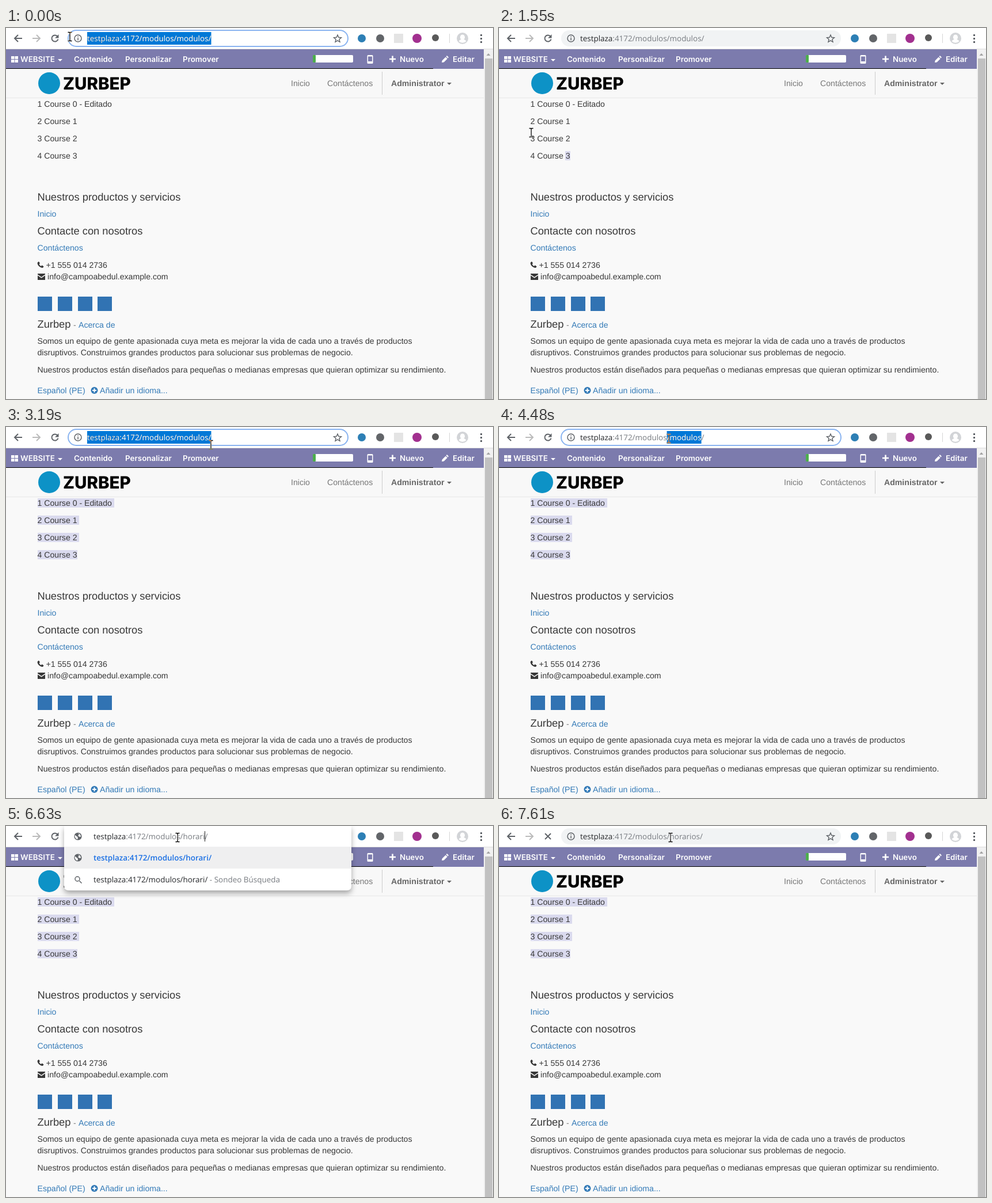
Recreate the animation shown at these times as an HTML page. Size 846x645 px, loop 8 s.

```html
<!DOCTYPE html>
<html lang="es">
<head>
<meta charset="utf-8">
<style>
  html, body { margin: 0; width: 100%; height: 100%; overflow: hidden; background: #f9f9f9; }
  svg { display: block; }
  text { white-space: pre; text-rendering: geometricPrecision; }
  .body { font: 14.12px "Liberation Sans", Arial, sans-serif; fill: #383838; }
  .head { font-size: 18.3px; }
  .link { fill: #337ab7; }
  .menu { fill: #777; }
  .nav { font: 600 13.4px Inter, sans-serif; fill: #fff; }
  .bar { font: 13.45px "Open Sans", sans-serif; fill: #777b80; }
  .dark { fill: #26282b; }
  .line { fill: none; stroke: #5f6368; stroke-width: 2; }
  #ibeam { mix-blend-mode: difference; }
  #popup { filter: drop-shadow(0 5px 5px #0005); }
</style>
</head>
<body>
<svg width="846" height="645" viewBox="0 0 846 645">
  <defs>
    <g id="globe">
      <circle r="6.6" fill="#5f6368"/>
      <path d="M-5-2.5Q-3 0-1 .5L0 3-1 5.3Q-5 4-5.4 0zM0-5.2L2-3.5 0-1 3 1 5 .5Q5-4 0-5.2z" fill="#fff"/>
    </g>
    <path id="caretDown" d="M-4-2h8l-4 4z"/>
    <clipPath id="selectedClip"><rect id="clipBox" y="7" height="22"/></clipPath>
  </defs>

  <!-- page -->
  <rect y="71" width="830" height="50" fill="#f8f8f8"/>
  <rect y="121" width="830" height="1" fill="#e7e7e7"/>
  <circle cx="75" cy="96" r="19" fill="#0d92c6"/>
  <text x="99" y="107" style="font:800 29.5px Inter,sans-serif">ZURBEP</text>
  <g id="marks" fill="#dadaee"></g>
  <g class="body">
    <text class="menu" x="495" y="101">Inicio</text>
    <text class="menu" x="558" y="101">Contáctenos</text>
    <rect x="653" y="76" width="1" height="40" fill="#ccc"/>
    <text x="669" y="101" style="font-weight:bold;fill:#666">Administrator</text>
    <use href="#caretDown" x="770" y="97" fill="#666"/>
    <text x="54.5" y="137">1 Course 0 - Editado</text>
    <text x="54.5" y="167">2 Course 1</text>
    <text x="54.5" y="197">3 Course 2</text>
    <text x="54.5" y="227">4 Course 3</text>
    <text class="head" x="54.5" y="300">Nuestros productos y servicios</text>
    <text class="link" x="54.5" y="328">Inicio</text>
    <text class="head" x="54.5" y="359">Contacte con nosotros</text>
    <text class="link" x="54.5" y="387">Contáctenos</text>
    <path d="M57 406l2 3-1.500 1.500q1 2.500 3.500 3.500l1.500-1.500 3 2q-1 3-3 2.500-7-2-8-8 0-2 2.500-3z"/>
    <text x="69.500" y="417">+1 555 014 2736</text>
    <path d="M55 427h13v1.500l-6.500 4.500-6.500-4.500zm0 3.300l6.500 4.400 6.500-4.400v7.700h-13z"/>
    <text x="72" y="437">info@campoabedul.example.com</text>
    <path d="M55 467h25v25h-25zm35 0h25v25h-25zm35 0h25v25h-25zm34 0h25v25h-25z" fill="#3173b3"/>
    <text class="head" x="54.5" y="521">Zurbep</text>
    <text class="menu" x="117" y="521">-</text>
    <text class="link" x="126" y="521">Acerca de</text>
    <text x="54.5" y="549">Somos un equipo de gente apasionada cuya meta es mejorar la vida de cada uno a través de productos</text>
    <text x="54.5" y="569">disruptivos. Construimos grandes productos para solucionar sus problemas de negocio.</text>
    <text x="54.5" y="599">Nuestros productos están diseñados para pequeñas o medianas empresas que quieran optimizar su rendimiento.</text>
    <text class="link" x="54.5" y="635">Español (PE)</text>
    <circle class="link" cx="153.500" cy="630" r="6"/>
    <path d="M150 630h7m-3.500-3.500v7" stroke="#fff" stroke-width="2"/>
    <text class="link" x="163" y="635">Añadir un idioma...</text>
  </g>

  <!-- site bar -->
  <path d="M0 37h830v34H0z" fill="#7c7bad"/>
  <path d="M0 70h742v1H0z"/>
  <rect id="hover" x="297" y="37" width="85" height="33"/>
  <g class="nav">
    <path d="M9 49h5.500v5H9zm6.500 0H21v5h-5.500zM9 55h5.500v5H9zm6.500 0H21v5h-5.500z"/>
    <text x="25" y="59">WEBSITE</text>
    <use href="#caretDown" x="94" y="56"/>
    <text x="118" y="59">Contenido</text>
    <text x="207" y="59">Personalizar</text>
    <text x="307" y="59">Promover</text>
    <rect x="533" y="47" width="70" height="13" rx="2"/>
    <rect x="533" y="47" width="5" height="13" rx="1" fill="#4cae4c"/>
    <path d="M629 47h7q1.500 0 1.500 1.500v12q0 1.500-1.500 1.500h-7q-1.500 0-1.500-1.500v-12q0-1.500 1.500-1.500zm0 2.500v8.500h7v-8.500z" fill-rule="evenodd"/>
    <path d="M666 54h11m-5.500-5.500v11" stroke="#fff" stroke-width="2.600"/>
    <text x="684" y="59">Nuevo</text>
    <path d="M757 60l.7-3.500 6-6 3 3-6 6zm7.500-10.500l1.500-1.500 3 3-1.500 1.500z"/>
    <text x="776" y="59">Editar</text>
  </g>

  <!-- scrollbar -->
  <path d="M830 37h16v608h-16z" fill="#f1f1f1"/>
  <path d="M832 53h13v592h-13z" fill="#c1c1c1"/>
  <path d="M834.500 48h7l-3.500-4z" fill="#a3a3a3"/>

  <!-- browser toolbar -->
  <path d="M0 0h846v36H0z" fill="#fff"/>
  <path d="M0 36h846v1H0z" fill="#ddd"/>
  <path class="line" d="M28 18H15.500M21 12l-6 6 6 6"/>
  <path class="line" d="M46 18h12.500M53 12l6 6-6 6" style="stroke:#bbb"/>
  <g id="reload">
    <path class="line" d="M89.500 14.500A5.600 5.600 0 1 0 90.500 19.500"/>
    <path d="M91.500 11v6.500H85z" fill="#5f6368"/>
  </g>
  <path id="stop" class="line" d="M80 13l10 10m0-10l-10 10"/>
  <rect id="pill" x="108" y="4" width="486" height="28" rx="14"/>
  <circle class="line" cx="125" cy="18" r="6" style="stroke-width:1.500"/>
  <path d="M124.300 17h1.500v4.500h-1.500zm0-2.800h1.500v1.500h-1.500z" fill="#5f6368"/>
  <path class="line" d="M576 12l1.800 4.300 4.700.4-3.600 3 1.100 4.600-4-2.500-4 2.500 1.100-4.600-3.600-3 4.700-.4z" style="stroke-width:1.400"/>
  <circle cx="618" cy="18" r="7" fill="#2d7fb5"/>
  <circle cx="650" cy="18" r="7" fill="#626569"/>
  <rect x="674" y="10" width="16" height="16" fill="#e4e4e4"/>
  <circle cx="714" cy="18" r="8" fill="#a2308f"/>
  <circle cx="746" cy="17" r="6" fill="#595959"/>
  <path d="M770 10h1v16h-1z" fill="#d5d5d5"/>
  <circle cx="793" cy="18" r="10" fill="#d2d4d7"/>
  <path d="M793 11.500a4 4.500 0 0 1 2.300 8.200q3 1 4.200 3.300a9 9 0 0 1-13 0q1.200-2.300 4.200-3.300a4 4.500 0 0 1 2.300-8.200z" fill="#fff"/>
  <path d="M824 11h3v3h-3zm0 6h3v3h-3zm0 6h3v3h-3z" fill="#5f6368"/>

  <!-- suggestions -->
  <g id="popup">
    <path d="M101 0h499v104q0 8-8 8H109q-8 0-8-8z" fill="#fff"/>
    <path d="M101 36h499v38H101z" fill="#efeff0"/>
    <use href="#globe" x="125" y="18"/>
    <use href="#globe" x="125" y="55"/>
    <path class="line" d="M127.500 95.500l4 4" style="stroke-width:1.600"/>
    <circle class="line" cx="124" cy="92" r="4" style="stroke-width:1.500"/>
    <text id="match" class="bar" x="152" y="60" style="font-weight:600;fill:#1a6fe4"></text>
    <text class="bar" x="152" y="98"><tspan id="query" class="dark"></tspan> - Sondeo Búsqueda</text>
  </g>

  <!-- address -->
  <rect id="selection" y="7" height="22" fill="#0078d7"/>
  <text id="address" class="bar" y="23"><tspan class="dark">testplaza</tspan><tspan id="path"></tspan></text>
  <text id="addressWhite" class="bar" x="141" y="23" style="fill:#fff" clip-path="url(#selectedClip)"></text>
  <rect id="caret" y="9" width="1" height="18" fill="#222"/>

  <!-- pointers, hot spot at 0,0 -->
  <path id="ibeam" d="M-3.500-7.500h2.500l1 1 1-1h2.500M0-6.500v13M-3.500 7.500h2.500l1-1 1 1h2.500" fill="none" stroke="#fff" stroke-width="1.300"/>
  <path id="arrow" d="M0 0v16l3.700-3.500 2.500 6 2.500-1-2.500-5.800h5.300z" fill="#fff" stroke="#000"/>
  <path id="hand" d="M-1.500 0q1.500-1.500 3 0v6q2.500-1 3 .7 2.500-.7 3 .8 2.500-.5 2.500 1.500v5l-2 3.500v2.500H-1.500v-2L-6 11q-1-2.500 1.500-2l3 2.500z" fill="#fff" stroke="#000"/>
</svg>
<script>
const LOOP = 8000;
const HOST = 'testplaza', BASE = ':4172/modulos/', PAGE = 'modulos/', TARGET = 'horarios';
const START = (HOST + BASE).length, END = START + PAGE.length;

// time, pointer, x, y
const pointerSteps = [
  [0, 'ibeam', 111, 15], [280, 'arrow', 226, 185], [420, 'arrow', 184, 201], [550, 'arrow', 148, 219],
  [690, 'ibeam', 132, 225], [830, 'ibeam', 125, 223], [1400, 'ibeam', 100, 212], [1550, 'ibeam', 56, 182],
  [1670, 'ibeam', 34, 178], [1810, 'ibeam', 26, 158], [1950, 'ibeam', 24, 142], [2100, 'arrow', 22, 131],
  [2380, 'arrow', 110, 122], [2510, 'arrow', 240, 84], [2660, 'hand', 340, 40], [2790, 'ibeam', 352, 31],
  [2920, 'ibeam', 356, 31], [3760, 'ibeam', 354, 22], [3890, 'ibeam', 353, 20], [4170, 'ibeam', 330, 20],
  [4330, 'ibeam', 308, 20], [4480, 'ibeam', 295, 20], [4910, 'ibeam', 297, 20], [5460, 'ibeam', 298, 20]
];
// time, focused, first and last selected character
const addressSteps = [
  [0, true, 0, END], [960, false, 0, 0], [3190, true, 0, END], [3760, true, END - 1, END - 1],
  [4170, true, START + 3, END - 1], [4330, true, START + 1, END - 1], [4480, true, START - 1, END - 1],
  [5030, true, START, END - 1], [5880, true, 0, 0], [7490, false, 0, 0]
];
const typeTimes = [5880, 6010, 6310, 6500, 6500, 6630, 6910, 7050];
// time, list rows marked from the bottom up
const markSteps = [[0, 0], [1400, .5], [1670, 2], [1810, 3], [1950, 4]];
const markWidths = [69, 72, 72, 133];

const el = id => document.getElementById(id);
const set = (id, attrs) => { for (const k in attrs) el(id).setAttribute(k, attrs[k]); };
const show = (id, on) => set(id, { visibility: on ? 'visible' : 'hidden' });
const at = (steps, t) => steps.findLast(s => s[0] <= t);

function drawAddress(t) {
  const [, focused, from, to] = at(addressSteps, t);
  const typed = typeTimes.filter(time => time <= t).length;
  const typing = typed > 0 && focused;
  const path = BASE + (typed ? TARGET.slice(0, typed) + '/' : PAGE);
  const full = HOST + path;
  const left = typing ? 152 : 141;
  el('path').textContent = path;
  for (const id of ['match', 'query', 'addressWhite']) el(id).textContent = full;
  set('address', { x: left });
  const offset = n => n ? left + el('address').getSubStringLength(0, n) : left;
  const box = { x: offset(from), width: offset(to) - offset(from) };
  set('selection', box);
  set('clipBox', box);
  show('caret', focused && from === to);
  set('caret', { x: Math.round(offset(typing ? START + typed : from)) });
  set('pill', focused
    ? { fill: '#fff', stroke: '#8ab4f0', 'stroke-width': 2 }
    : { fill: '#f1f3f4', stroke: 'none' });
  show('popup', typing);
  show('reload', t < 7490);
  show('stop', t >= 7490);
}

function draw(now) {
  const t = now % LOOP;
  const [, pointer, x, y] = at(pointerSteps, t);
  for (const id of ['ibeam', 'arrow', 'hand']) show(id, id === pointer);
  set(pointer, { transform: `translate(${x} ${y})` });
  show('hover', pointer === 'hand');

  const marked = at(markSteps, t)[1];
  el('marks').innerHTML = markWidths.slice(0, Math.ceil(marked)).map((w, i) => {
    const skip = marked < 1 ? 60 : 0;
    return `<rect x="${55 + skip}" y="${214 - 30 * i}" width="${w - skip}" height="16"/>`;
  }).join('');

  drawAddress(t);
  requestAnimationFrame(draw);
}
requestAnimationFrame(draw);
</script>
</body>
</html>
```
